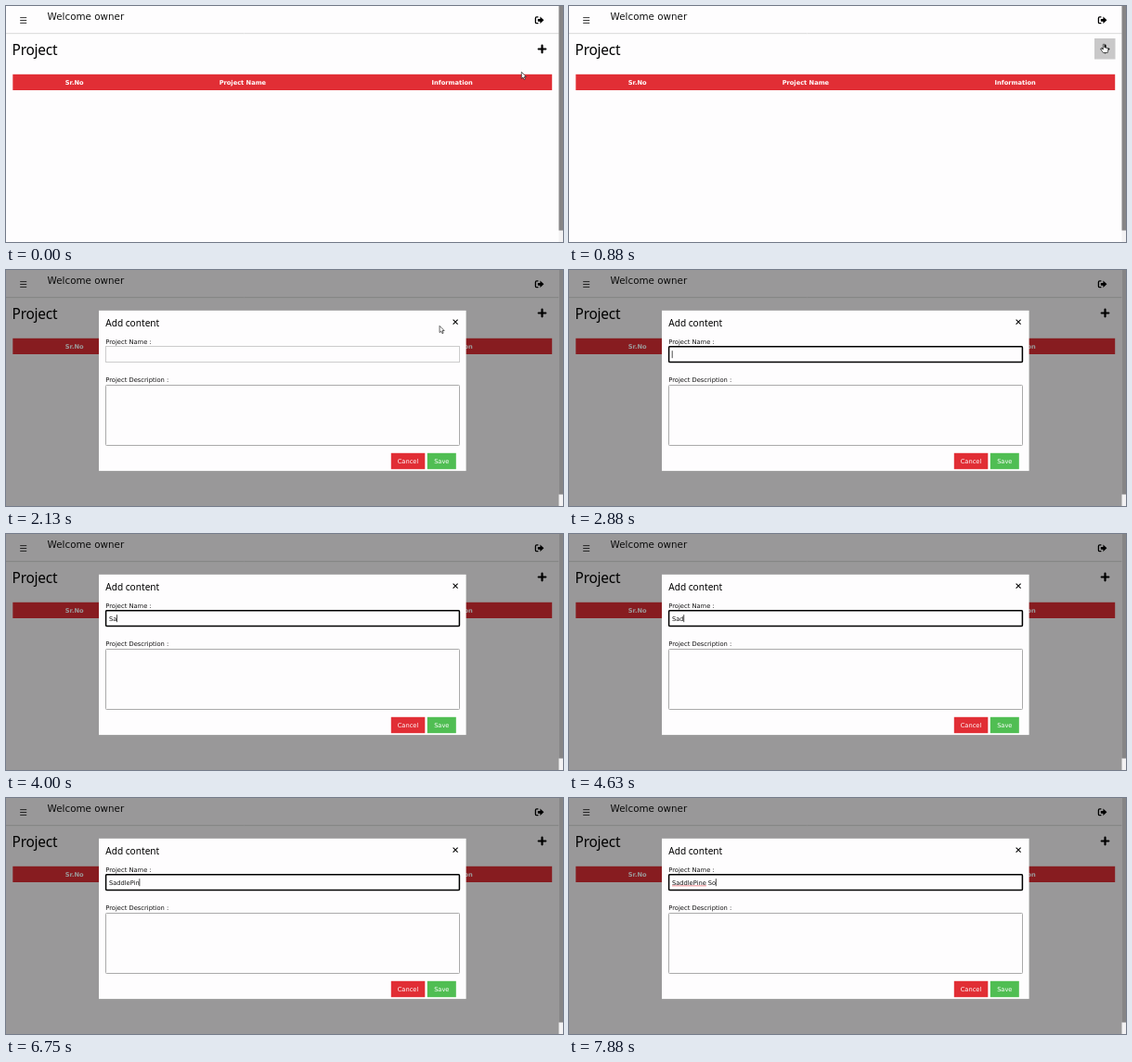
An HTML page for the animation above (8000 ms loop, 600 by 255 pixels).

```html
<!DOCTYPE html>
<html lang="en">
<head>
<meta charset="utf-8">
<title>Add project</title>
<style>
  html, body { margin: 0; width: 100%; height: 100%; overflow: hidden; background: #fefdfe; }
  svg { display: block; width: 600px; height: 255px; }
  text { font-family: "DejaVu Sans", sans-serif; font-size: 6.75px; fill: #111; white-space: pre; }
  .title { font-family: "Noto Sans", sans-serif; fill: #000; }
  .head { font-weight: bold; font-size: 6.67px; fill: #fff; text-anchor: middle; }
  .btn { font-size: 6.67px; fill: #fff; text-anchor: middle; }
  .field { fill: #fefdfe; stroke: #ccc; stroke-width: 1; }
  .red { fill: #e12e35; }
  .pointer { fill: #fff; stroke: #222; stroke-width: .7; stroke-linejoin: round; }
</style>
</head>
<body>
<svg viewBox="0 0 600 255">
  <rect width="600" height="255" fill="#fefdfe"/>

  <!-- top bar -->
  <path d="M15.2 12.6h7M15.2 15.5h7M15.2 18.4h7" stroke="#222" stroke-width=".9"/>
  <text x="44.6" y="15.4" style="font-size:10.35px">Welcome owner</text>
  <path d="M573.4 11.9h-1.8q-1.2 0-1.2 1.2v4.3q0 1.2 1.2 1.2h1.8" fill="none" stroke="#000" stroke-width="1.3"/>
  <path d="M572.8 13.9h2.6v-2.4l4 3.8-4 3.8v-2.4h-2.6z"/>
  <path d="M0 29.7h596" stroke="#d8d8d8"/>

  <!-- project list -->
  <text class="title" x="6.6" y="53.2" style="font-size:15.4px;letter-spacing:-.22px">Project</text>
  <rect id="hover" x="566" y="35" width="22.5" height="22.5" fill="#c9c8c9"/>
  <path d="M573.7 46.5h7.6M577.5 42.7v7.6" stroke="#000" stroke-width="2.2" stroke-linecap="round"/>
  <rect class="red" x="7.3" y="73.8" width="580.9" height="17.2"/>
  <text class="head" x="73.7" y="85">Sr.No</text>
  <text class="head" x="254.9" y="85">Project Name</text>
  <text class="head" x="480.7" y="85">Information</text>

  <!-- scrollbar -->
  <rect x="595.5" width="4.5" height="255" fill="#f3f2f3"/>
  <rect x="595.5" width="4.5" height="242.5" fill="#868586"/>

  <g id="modal">
    <rect width="595.5" height="255" fill="#000" opacity=".4"/>
    <rect x="100" y="43.8" width="395.6" height="173.3" fill="#fefdfe"/>
    <text class="title" x="107.2" y="61" style="font-size:10.15px">Add content</text>
    <path d="M481.6 53.6l5 5m0-5l-5 5" stroke="#000" stroke-width="1.1"/>
    <text x="107.2" y="79.6">Project Name :</text>
    <rect class="field" x="107.5" y="82.5" width="381" height="17"/>
    <rect id="focus" x="107.6" y="82.7" width="380.8" height="16.7" rx="1" fill="none" stroke="#000" stroke-width="1.5"/>
    <text id="typed" x="111" y="93.6" style="font-size:6.67px"></text>
    <path id="wave" fill="none" stroke="#e5202b" stroke-width=".5"/>
    <path id="caret" d="M0 87.2v8" stroke="#000" stroke-width=".7"/>
    <text x="107.2" y="121.3">Project Description :</text>
    <rect class="field" x="107.5" y="124.5" width="381" height="65" rx=".8" style="stroke:#aaa"/>
    <rect class="red" x="414.8" y="197.8" width="36.5" height="17.4"/>
    <text class="btn" x="433" y="208.9">Cancel</text>
    <rect x="453.8" y="197.8" width="31" height="17.4" fill="#50be53"/>
    <text class="btn" x="469.3" y="208.9">Save</text>
  </g>

  <path id="arrow" class="pointer" d="M0 0v7.2l1.7-1.5 1.2 2.6 1.2-.6-1.2-2.5h2.2z"/>
  <path id="hand" class="pointer" d="M-.7 .5q.8-1 1.5 0v3.2l3.2.8q.9.3.9 1.2l-.7 3.8h-4.8l-2.6-3.9q.5-1.2 1.6-.4l.9.8z"/>
  <path id="beam" d="M-1.3-4h2.6M0-4v8M-1.3 4h2.6" fill="none" stroke="#222" stroke-width=".7"/>
</svg>
<script>
const LOOP = 8000, TICK = 125;
const OPEN = 1125, MOVE = 1875, FOCUS = 2875, SPELL = 7250;
const NAME = "SaddlePine", VALUE = NAME + " So";

// time, typed letters, caret visible
const typing = [
  [0, 0, 0], [FOCUS, 0, 1], [3375, 0, 0], [3625, 1, 1], [4000, 2, 1],
  [4500, 2, 0], [4625, 3, 1], [5000, 4, 1], [5250, 5, 1], [5500, 6, 1],
  [6000, 6, 0], [6250, 7, 1], [6500, 8, 1], [6750, 9, 1], [7000, 10, 1],
  [SPELL, 11, 1], [7500, 12, 1], [7875, 13, 1]
];
// time, pointer, x, y
const pointing = [
  [0, "arrow", 555.3, 71.3], [250, "hand", 577, 47],
  [375, "hand", 576, 41.3], [875, "hand", 576, 41], [OPEN, "arrow", 575.3, 40.3]
];

const $ = id => document.getElementById(id);
const show = (id, on) => { $(id).style.display = on ? "" : "none"; };
const at = (steps, t) => steps.filter(s => s[0] <= t).pop();
const ease = p => p * p * (3 - 2 * p);

function pointer(t) {
  if (t >= FOCUS) return [null, 0, 0];
  if (t < MOVE) return at(pointing, t).slice(1);
  const p = ease(Math.min(7, Math.floor((t - MOVE) / TICK) + 1) / 7);
  const x = 575.3 - 275 * p, y = 40.3 + 51 * p;
  return [y > 83 ? "beam" : "arrow", x, y];
}

function drawWave() {
  $("typed").textContent = NAME;
  const n = Math.round($("typed").getComputedTextLength());
  let d = "M111 95.2";
  for (let i = 1; i <= n; i++) d += `L${111 + i} ${i % 2 ? 94.5 : 95.2}`;
  $("wave").setAttribute("d", d);
}

function draw(t) {
  show("modal", t >= OPEN);
  show("hover", t >= 250 && t < OPEN);
  show("focus", t >= FOCUS);
  show("wave", t >= SPELL);

  const [, count, caret] = at(typing, t), typed = $("typed");
  const value = VALUE.slice(0, count);
  if (typed.textContent !== value) typed.textContent = value;
  show("caret", caret);
  if (caret) {
    const x = 111 + (count ? typed.getComputedTextLength() : 0);
    $("caret").setAttribute("transform", `translate(${x + .2} 0)`);
  }

  const [kind, x, y] = pointer(t);
  for (const id of ["arrow", "hand", "beam"]) show(id, id === kind);
  if (kind) $(kind).setAttribute("transform", `translate(${x} ${y})`);
}

drawWave();
const start = performance.now();
function frame() {
  draw((performance.now() - start) % LOOP);
  requestAnimationFrame(frame);
}
frame();
</script>
</body>
</html>
```
